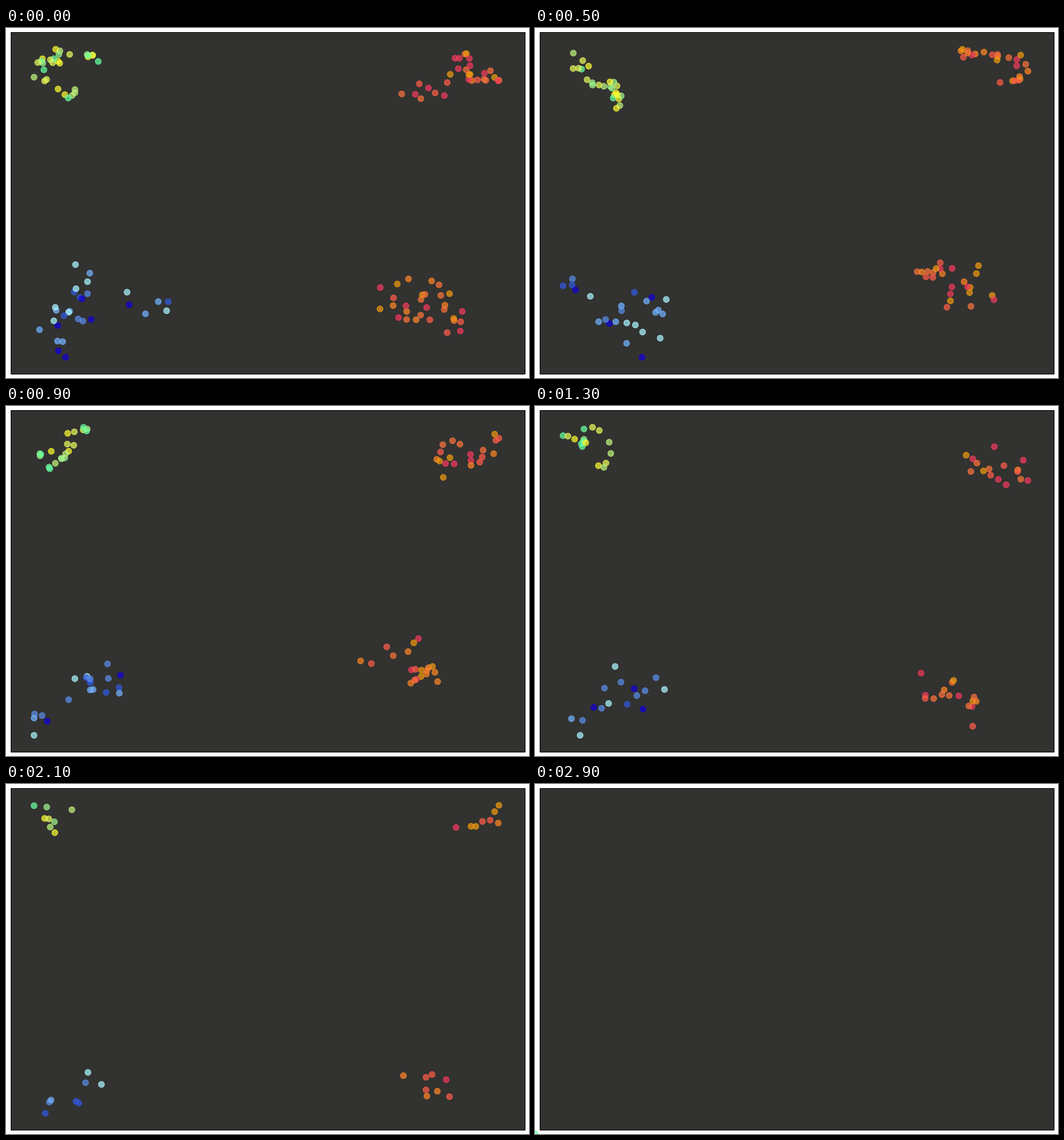
A matplotlib script for the animation above (3 s loop, 886x592 px).

```python
import numpy as np
import matplotlib.pyplot as plt
from matplotlib.animation import FuncAnimation
from matplotlib.patches import Rectangle

W, H, DPI = 886, 592, 64
PX = 72 / DPI  # points per pixel
FRAMES, INTERVAL = 30, 100
ALPHA = 0.72
LOW, HIGH = np.array([47.5, 36]), np.array([835, 557])

GREENS = ["#67fea1", "#9df38d", "#bef37c", "#e6f75a", "#fafa32"]
REDS = ["#ef9a0f", "#fe8525", "#fa723a", "#fe5d48", "#f33a5d"]
BLUES = ["#a9f5fe", "#71b2ff", "#5a8be8", "#3159df", "#1200d5"]

# Each cluster: palette, centre, spread when full
CLUSTERS = [
    (GREENS, (112, 90), (30, 27)),
    (REDS, (770, 90), (42, 22)),
    (BLUES, (140, 495), (58, 38)),
    (REDS, (702, 482), (40, 26)),
]


def wander(centre, spread, count, rng):
    """A random walk around a centre, tighter as dots run out."""
    walk = np.cumsum(rng.normal(size=(count, 2)), axis=0)
    walk -= walk.mean(axis=0)
    walk /= np.maximum(walk.std(axis=0), 0.1)
    size = np.array(spread) * np.sqrt(count / (FRAMES - 1))
    return centre + rng.uniform(-22, 22, 2) + walk * size


def fit(dots):
    """Stretch the dots so that they fill the plot's data box."""
    low, high = dots.min(axis=0), dots.max(axis=0)
    return LOW + (dots - low) / (high - low) * (HIGH - LOW)


fig = plt.figure(figsize=(W / DPI, H / DPI), dpi=DPI, facecolor="white")
ax = fig.add_axes([0, 0, 1, 1])
ax.set(xlim=(0, W), ylim=(H, 0))
ax.axis("off")
ax.add_patch(Rectangle((8.5, 7.5), 871, 578, facecolor="#323230",
                       edgecolor="black", linewidth=PX, snap=False))
dots = ax.scatter([], [], s=(10 * PX) ** 2, linewidths=1.2 * PX)


def draw(step):
    rng = np.random.default_rng(step)
    count = FRAMES - 1 - step
    if count == 0:
        dots.set_offsets(np.empty((0, 2)))
        return dots,
    groups, colors = [], []
    for palette, centre, spread in CLUSTERS:
        groups.append(wander(centre, spread, count, rng))
        colors += [(c, ALPHA) for c in rng.choice(palette, count)]
    dots.set_offsets(fit(np.vstack(groups)))
    dots.set_facecolor(colors)
    dots.set_edgecolor(colors)
    return dots,


anim = FuncAnimation(fig, draw, frames=FRAMES, interval=INTERVAL,
                     repeat=True, repeat_delay=0)
plt.show()
```
